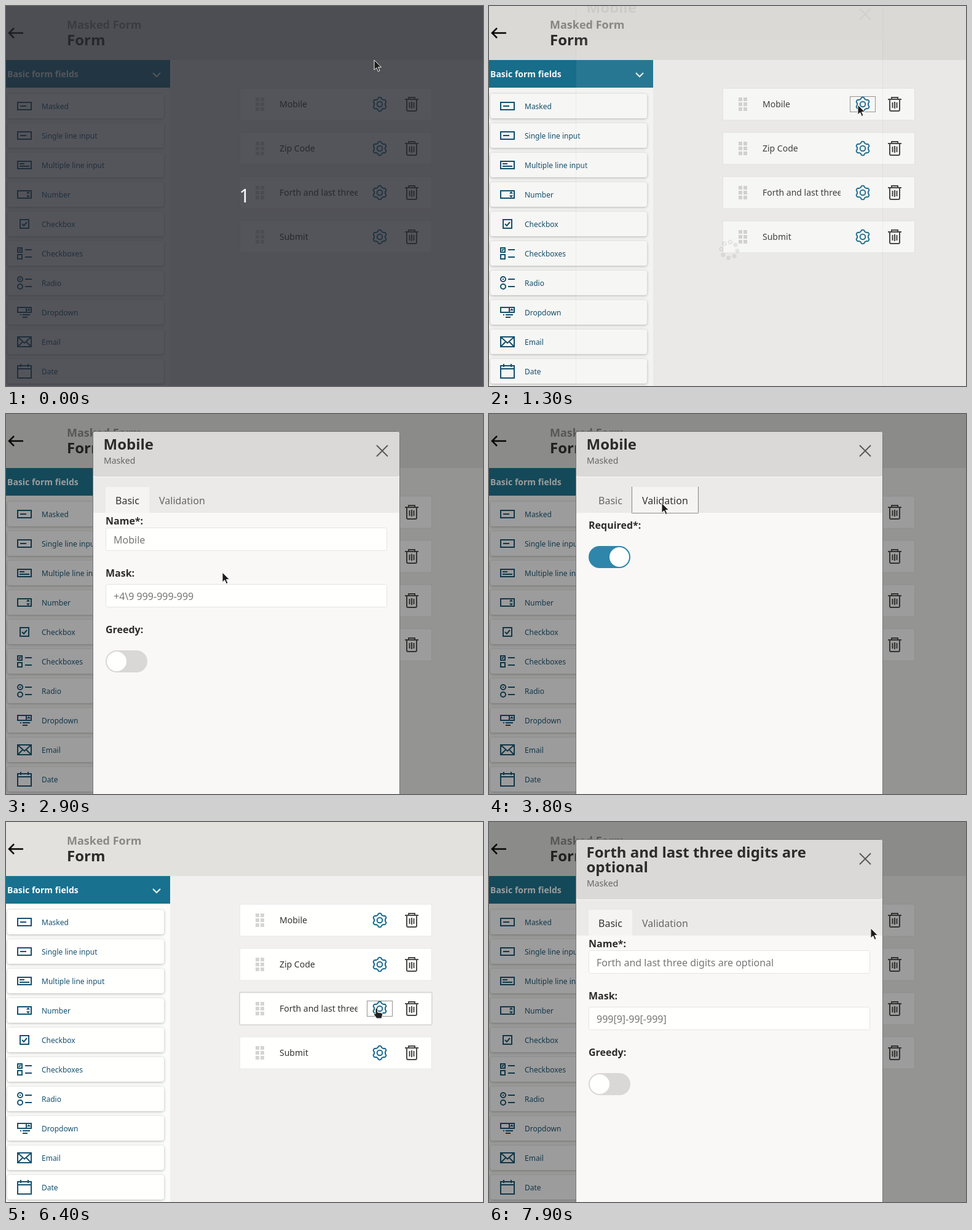
An HTML page that plays this animation: 776 px wide and 619 px high, repeating every 8000 ms.

```html
<!DOCTYPE html>
<html lang="en">
<head>
<meta charset="utf-8">
<title>Masked form builder</title>
<style>
  html, body { margin: 0; width: 100%; height: 100%; overflow: hidden; }
  svg { display: block; font-family: "Noto Sans", sans-serif; }
  .icon { fill: none; stroke: #14526f; stroke-width: 2; }
  .item { fill: #fffffe; filter: drop-shadow(0 1px 2px rgba(0, 0, 0, .28)); }
</style>
</head>
<body>
<svg id="stage" width="776" height="619" viewBox="0 0 776 619"></svg>
<script>
const LOOP = 8000, STEP = 100;
const stage = document.getElementById('stage');

const rect = (x, y, w, h, fill, more = '') =>
  `<rect x="${x}" y="${y}" width="${w}" height="${h}" fill="${fill}" ${more}/>`;
const text = (x, y, size, fill, str, more = '') =>
  `<text x="${x}" y="${y}" font-size="${size}" fill="${fill}" ${more}>${str}</text>`;
const path = (d, stroke, width = 2, more = '') =>
  `<path d="${d}" fill="none" stroke="${stroke}" stroke-width="${width}" ${more}/>`;
const circle = (x, y, r, fill, more = '') => `<circle cx="${x}" cy="${y}" r="${r}" fill="${fill}" ${more}/>`;
const at = (x, y, body, more = '') => `<g transform="translate(${x} ${y})" ${more}>${body}</g>`;
const bold = 'font-weight="700"';

// Sidebar icons, drawn around their centre
const box = 'M-11-6H11V6H-11Z';
const rows = 'M1-6H12M1 6H12';
const fields = [
  ['Masked', box + 'M-7 0H3'],
  ['Single line input', box + 'M-7 0H3'],
  ['Multiple line input', box + 'M-8-2H0M-8 2H8'],
  ['Number', box + 'M4-1.5L6-3.5 8-1.5M4 1.5L6 3.5 8 1.5'],
  ['Checkbox', 'M-7-7H7V7H-7ZM-4 0L-1 3 4-3'],
  ['Checkboxes', 'M-11-9H-4V-2H-11ZM-11 2H-4V9H-11ZM-9-6L-8-5-6-7' + rows],
  ['Radio', 'M-11-6a4 4 0 1 0 8 0a4 4 0 1 0-8 0M-11 6a4 4 0 1 0 8 0a4 4 0 1 0-8 0M-8-6h2' + rows],
  ['Dropdown', 'M-11-8H11V0H-11ZM3-8V0M5-3L7-5 9-3M-7 4H-5M-3 4H9M-3 8H5'],
  ['Email', 'M-11-8H11V8H-11ZL0 2 11-8M-11 8L-3 0M11 8L3 0'],
  ['Date', 'M-11-9H11V11H-11ZM-11-4H11M-6-12V-7M6-12V-7'],
];
const cards = ['Mobile', 'Zip Code', 'Forth and last three digits are optional', 'Submit'];

const gearPath = 'M' + Array.from({ length: 72 }, (_, i) => {
  const a = i * Math.PI / 36, r = 10.1 + 1.2 * Math.tanh(2 * -Math.cos(6 * a));
  return `${(r * Math.cos(a)).toFixed(2)} ${(r * Math.sin(a)).toFixed(2)}`;
}).join('L') + 'Z';
const gear = path(gearPath, '#17698f', 2, 'stroke-linejoin="round"') +
  circle(0, 0, 4.3, 'none', 'stroke="#17698f" stroke-width="2"');
const trash = path('M-11-8H11M-5-8V-11H5V-8M-8-8V9Q-8 11-6 11H6Q8 11 8 9V-8M-3.5-3V6M0-4V7M3.5-3V6', '#4b4a49');
const grip = [0, 1, 2, 3, 4, 5].map(i =>
  rect(406 + i % 2 * 8, 149 + (i >> 1) * 8, 6, 6, '#d6d5d4')).join('');

function sidebar() {
  return rect(0, 88, 267, 531, '#fcfcfb') + rect(0, 88, 267, 45, '#18718f') +
    text(2, 116, 14, '#fff', 'Basic form fields', bold) + path('M239 109L245 115 251 109', '#fff') +
    fields.map(([name, d], i) => at(0, 163 + 48 * i,
      rect(2, -20, 255, 40, '#fff', 'rx="4" class="item"') +
      text(58, 5, 12, '#14526f', name) +
      at(30, 0, `<path class="icon" d="${d}"/>`))).join('');
}

function card(name, i) {
  return at(0, 72 * i, rect(380.5, 134, 312, 52, '#fffffe', 'stroke="#e9e8e7"') + grip +
    `<svg x="445" y="140" width="127" height="40">${text(0, 25, 14, '#333', name)}</svg>` +
    at(608, 160, gear) + at(660, 160, trash));
}

const page = rect(0, 0, 776, 619, '#f1f0ef') + rect(0, 0, 776, 88, '#e2e1de') +
  path('M28 44H5M13 36L5 44 13 52', '#000', 2.5) +
  text(99, 37, 18, '#8a8986', 'Masked Form', bold) +
  text(99, 64, 24, '#2c2c2b', 'Form', bold) + sidebar() + cards.map(card).join('');

const toggle = (y, on) => rect(162, y, 68, 36, on ? '#2e86ab' : '#d9d8d7', 'rx="18"') +
  circle(on ? 212 : 180, y + 18, 16, '#fffffe');

function field(y, label, value, selected) {
  return text(162, y, 16, '#2c2c2b', label, bold) +
    rect(162.5, y + 12.5, 457, 37, '#fffffe', 'rx="3" stroke="#e5e4e3"') +
    (selected < 303 ? rect(selected, y + 20, 303 - selected, 22, '#8fc3e8') : '') +
    text(175, y + 38, 16, '#777', value);
}

function spinner(t) {
  const dots = [0, 1, 2, 3, 4, 5, 6, 7].map(i => {
    const a = i * Math.PI / 4 - 1.15, hollow = i < 3;
    return circle(13 * Math.cos(a), 13 * Math.sin(a), hollow ? 2.8 : 3.6, hollow ? '#ddd' : '#1c1c1c',
      hollow ? 'stroke="#1c1c1c" stroke-width="2"' : '');
  }).join('');
  return at(391, 444, `<g transform="rotate(${(t - 600) % 1000 * .36})">${dots}</g>`);
}

function tabs(validation) {
  const tab = (x, w, label, active) => (active ? rect(x, 119, w, 42, '#f5f4f3') : '') +
    text(x + 16, 147, 16, active ? '#333' : '#666', label);
  return rect(142, 102, 498, 59, '#ebeae9') + rect(142, 102, 498, 1, '#f8f8f7') +
    tab(162, 71, 'Basic', !validation) + tab(233, 107, 'Validation', validation) +
    (validation ? path('M232.5 119V161.5H340.5V119', '#222', 1, 'stroke-dasharray="1 1"') : '');
}

function dialog(d, t, cursorX) {
  const extra = 24 * (d.title.length - 1);
  const selected = t >= 2200 && t < 2600 ? Math.max(175, cursorX) : 999;
  const content = d.validation
    ? text(162, 187, 16, '#2c2c2b', 'Required*:', bold) + toggle(215, true)
    : field(173 + 7, 'Name*:', d.name, 999).replaceAll('y="192.5"', 'y="185.5"').replace('y="218"', 'y="211"') +
      field(265, 'Mask:', d.mask, selected) +
      text(162, 357, 16, '#2c2c2b', 'Greedy:', bold) + toggle(385, false);
  return rect(0, 0, 776, 619, `rgba(16,16,16,${.41 * Math.min(1, d.alpha * 1.1)})`) +
    at(0, d.shift,
      rect(141.5, 28.5, 499, 700, '#f9f8f7', 'rx="4" stroke="#777"') +
      rect(142, 29, 498, 73 + extra, '#dad9d8', 'rx="3"') +
      d.title.map((line, i) => text(158.5, 58 + 24 * i, 24, '#2c2c2b', line, bold)).join('') +
      text(159, 81 + extra, 14, '#666', 'Masked') +
      path('M603 51L621 69M621 51L603 69', '#5a5a59') +
      (d.loading ? spinner(t) : at(0, extra, tabs(d.validation) + content)),
      `opacity="${d.alpha}"`);
}

function dialogAt(t) {
  const first = t < 6000, start = first ? 1290 : 6490, age = t - start;
  const closing = first ? Math.max(0, (t - 5340) / 220) : 0;
  if (age < 0 || closing >= 1) return null;
  const left = Math.max(0, 1 - age / 300);
  return {
    title: first ? ['Mobile'] : ['Forth and last three digits are', 'optional'],
    name: first ? 'Mobile' : cards[2],
    mask: first ? '+4\\9 999-999-999' : '999[9]-99[-999]',
    validation: first && t >= 3400,
    loading: age < 310,
    shift: -50 * Math.max(left * left, closing * closing),
    alpha: Math.min(1, age / 135, 1 - closing),
  };
}

// Arrival time, x, y, travel time
const moves = [
  [0, 599, 88], [400, 608, 99], [800, 602, 160, 400], [1300, 600, 161], [1700, 497, 249, 300],
  [1900, 387, 279, 200], [2200, 310, 302], [2400, 122, 297, 200], [2600, 372, 326], [2700, 360, 277],
  [2900, 352, 258], [3300, 284, 148, 300], [3600, 183, 146], [3800, 281, 145], [4000, 447, 561],
  [4100, 470, 650], [4500, 484, 600], [4600, 590, 250], [4700, 659, 4], [4800, 630, 29],
  [5200, 608, 60, 300], [6200, 601, 303, 800], [6600, 600, 303], [6900, 583, 297, 200],
  [7100, 580, 297], [7300, 577, 296], [7900, 621, 173, 300],
];

function cursorAt(t) {
  let [, x, y] = moves[0];
  for (const [end, nx, ny, span = STEP] of moves) {
    const p = Math.min(1, Math.max(0, (t - end + span) / span));
    x += (nx - x) * p;
    y += (ny - y) * p;
  }
  return [x, y];
}

const shape = (d, fill, line) => `<path d="${d}" fill="${fill}" stroke="${line}" stroke-linejoin="round"/>`;
const arrow = shape('M0 0V16L3.8 12.6 6.4 18.6 9 17.4 6.4 11.6H11.4Z', '#1c1c1c', '#f4f4f4');
const hand = shape('M0 2Q0 0 1.5 0T3.5 2V7L10 8Q12 8.5 11.5 11L10 17H2L-3 10Q-3 8 0 9.5Z', '#222', '#f4f4f4');
const beam = path('M-3-8.5H-1L0-7.5 1-8.5H3M0-8V8M-3 8.5H-1L0 7.5 1 8.5H3', '#222', 1.3);

function cursor(t, x, y, modal) {
  const overGear = !modal && x > 595 && x < 621 && Math.abs((y - 160 + 36) % 72 - 36) < 13 && y > 147;
  const typing = t >= 1900 && t < 2600;
  return at(x, y, typing ? beam : overGear ? hand : arrow);
}

function render(t) {
  const [x, y] = cursorAt(t), modal = dialogAt(t);
  let out = page;
  const row = Math.floor((y - 134) / 72);
  if (!modal && x > 381 && x < 692 && y > 134 && row < 4 && (y - 134) % 72 < 52)
    out += rect(380, 133.5 + 72 * row, 313, 53, 'none', 'stroke="#dcdbda" stroke-width="2" rx="2"');
  const focus = t >= 1000 && t < 5500 ? 0 : t >= 6400 ? 2 : -1;
  if (focus >= 0)
    out += rect(587.5, 147.5 + 72 * focus, 41, 25, 'none', 'stroke="#222" stroke-dasharray="1 1"');
  if (modal) out += dialog(modal, t, x);
  if (t < 400)
    out += rect(0, 0, 776, 619, 'rgba(36,38,46,.78)') +
      text(388, 320, 30, '#fff', '1', 'text-anchor="middle"');
  stage.innerHTML = out + cursor(t, x, y, modal);
}

let shown = -1;
function tick() {
  const t = Math.floor(performance.now() % LOOP / STEP) * STEP;
  if (t !== shown) render(shown = t);
  requestAnimationFrame(tick);
}
tick();
</script>
</body>
</html>
```
